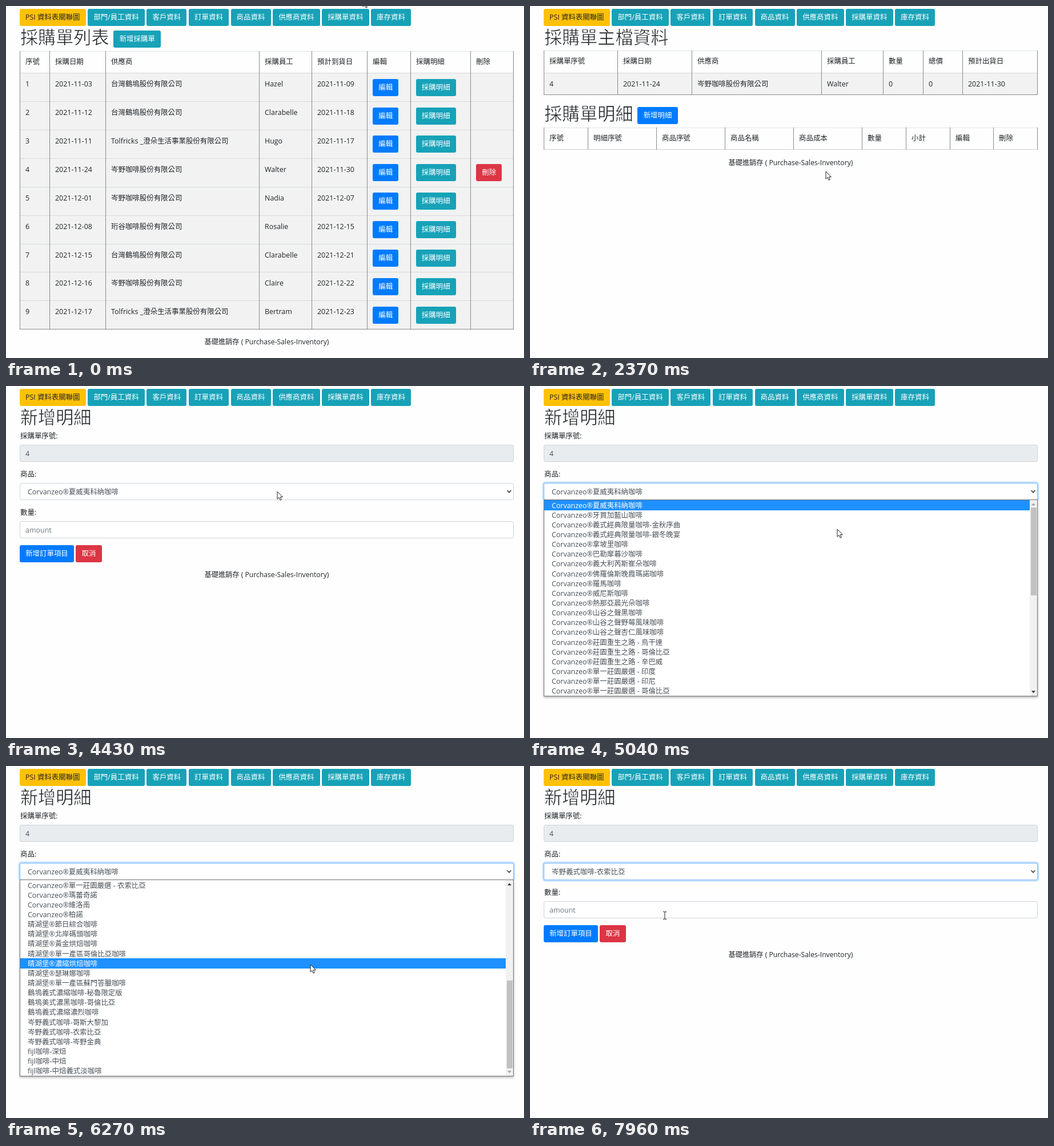
An HTML page for the animation above (8 s loop, 907 by 617 pixels).

```html
<!DOCTYPE html>
<html lang="zh-Hant">
<head>
<meta charset="utf-8">
<title>PSI</title>
<style>
html, body { margin: 0; width: 100%; height: 100%; overflow: hidden; background: #fefefe; }
body { position: relative; font: 12.45px "Open Sans", "Noto Sans CJK TC", "Noto Sans CJK JP", sans-serif; color: #212529; }
div { position: absolute; box-sizing: border-box; white-space: pre; }
.page { inset: 0; }
.btn { border-radius: 3px; color: #fff; text-align: center; line-height: 29px; }
.title { font-size: 31.1px; font-weight: 300; -webkit-text-stroke: .6px #fefefe; }
.th { font-weight: 500; }
.field { border: 1px solid #ced4da; border-radius: 3px; background: #fff; }
.grey { color: #495057; }
svg { position: absolute; left: 0; top: 0; overflow: visible; }
</style>
</head>
<body>
<script>
const LOOP = 8000, STEP = 68.17, START = 120, BTN_H = 30;
const TEAL = ['#17a2b8', '#138496', 'rgba(23,162,184,.5)'];
const BLUE = ['#007bff', '#0069d9', 'rgba(0,123,255,.5)'];
const RED = ['#dc3545', '#c82333', 'rgba(220,53,69,.5)'];
const GOLD = ['#ffc107', '#e0a800', 'rgba(255,193,7,.5)'];

function box(parent, x, y, w, h, css = '', cls = '', text = '') {
  const d = document.createElement('div');
  d.className = cls;
  d.style.cssText = `left:${x}px;top:${y}px;width:${w}px;height:${h}px;${css}`;
  d.textContent = text;
  parent.append(d);
  return d;
}

// Text with its left edge at x, centred on cy.
function label(parent, x, cy, text, cls = '', css = '') {
  return box(parent, x, cy - 20, 0, 40, 'line-height:40px;' + css, cls, text);
}

function button(page, x, y, w, tone, text, css = '') {
  const el = box(page, x, y, w, BTN_H, `background:${tone[0]};` + css, 'btn', text);
  const b = { el, x, y, w, tone };
  page.buttons.push(b);
  return b;
}

function makePage(title) {
  const page = box(document.body, 0, 0, 907, 617, '', 'page');
  page.buttons = [];
  button(page, 24, 4.7, 115.5, GOLD, 'PSI 資料表關聯圖', 'color:#212529');
  const nav = [[143, 100, '部門/員工資料'], [246.3, 70, '客戶資料'], [320, 70, '訂單資料'], [393.5, 70, '商品資料'],
    [467, 82.5, '供應商資料'], [553, 82.5, '採購單資料'], [639, 70, '庫存資料']];
  for (const [x, w, text] of nav) button(page, x, 4.7, w, TEAL, text);
  label(page, 25, 53.5, title, 'title');
  return page;
}

const footer = (page, cy) => box(page, 0, cy - 20, 913, 40, 'line-height:40px;text-align:center;font-size:12.2px', '',
  '基礎進銷存 ( Purchase-Sales-Inventory)');

function table(page, xs, y, headH, rowH, heads, rows, textY) {
  const left = xs[0], width = xs[xs.length - 1] - left + 1, bottom = y + headH + rowH * rows.length;
  const line = (ly, color) => box(page, left, Math.round(ly), width, 1, `background:${color}`);
  heads.forEach((h, i) => label(page, xs[i] + 10, y + 19.3, h, 'th'));
  rows.forEach((cells, r) => {
    const top = y + headH + rowH * r;
    box(page, left, top, width, rowH, 'background:#f2f2f2');
    cells.forEach((c, i) => label(page, xs[i] + 10, top + textY, c));
  });
  line(y, '#dee2e6');
  rows.forEach((_, r) => line(y + headH + rowH * r, '#d5d9dd'));
  line(bottom, rows.length ? '#8a8a8a' : '#ccd0d4');
  for (const x of xs) box(page, x, y, 1, bottom - y + 1, 'background:#8a8a8a');
}

// Purchase list
const list = makePage('採購單列表');
button(list, 188.4, 43, 82.7, TEAL, '新增採購單');
const crane = '台灣鶴塢股份有限公司', tolf = 'Tolfricks _澄朵生活事業股份有限公司', cen = '岑野咖啡股份有限公司';
const orders = [
  ['11-03', crane, 'Hazel', '11-09'], ['11-12', crane, 'Clarabelle', '11-18'], ['11-11', tolf, 'Hugo', '11-17'],
  ['11-24', cen, 'Walter', '11-30'], ['12-01', cen, 'Nadia', '12-07'], ['12-08', '珩谷咖啡股份有限公司', 'Rosalie', '12-15'],
  ['12-15', crane, 'Clarabelle', '12-21'], ['12-16', cen, 'Claire', '12-22'], ['12-17', tolf, 'Bertram', '12-23']
].map(([d, firm, who, due], i) => [i + 1, '2021-' + d, firm, who, '2021-' + due]);
table(list, [24, 76, 174, 443, 535, 632, 708, 813, 888], 79, 38.3, 49.87,
  ['序號', '採購日期', '供應商', '採購員工', '預計到貨日', '編輯', '採購明細', '刪除'], orders, 20);
const details = orders.map((_, i) => {
  const y = 127.7 + 49.87 * i;
  button(list, 642, y, 45.4, BLUE, '編輯');
  if (i === 3) button(list, 823, y, 45.4, RED, '刪除');
  return button(list, 717.5, y, 70.5, TEAL, '採購明細');
});
footer(list, 588.5);

// Purchase record
const record = makePage('採購單主檔資料');
table(record, [24, 153, 283, 510, 618, 688, 757, 888], 78, 38.8, 38.5,
  ['採購單序號', '採購日期', '供應商', '採購員工', '數量', '總價', '預計出貨日'],
  [['4', '2021-11-24', cen, 'Walter', '0', '0', '2021-11-30']], 19.8);
label(record, 25, 187.5, '採購單明細', 'title');
const addItem = button(record, 188.4, 177, 70.3, BLUE, '新增明細');
table(record, [24, 101, 221, 341, 461, 581, 658, 735, 811, 888], 212.5, 38.5, 0,
  ['序號', '明細序號', '商品序號', '商品名稱', '商品成本', '數量', '小計', '編輯', '刪除'], [], 0);
footer(record, 274.5);

// New item form
const form = makePage('新增明細');
label(form, 25, 87.5, '採購單序號:');
box(form, 24, 103, 865, BTN_H, 'background:#e9ecef', 'field');
label(form, 34, 118.5, '4', 'grey');
label(form, 25, 154.5, '商品:');
const select = box(form, 24, 169.8, 865, BTN_H, '', 'field');
const chosen = label(form, 38, 185.5, '', 'grey');
form.insertAdjacentHTML('beforeend',
  '<svg width="907" height="617"><path d="M877.6 183l3.4 3.6l3.4-3.6" fill="none" stroke="#343a40" stroke-width="1.6"/></svg>');
label(form, 25, 221.5, '數量:');
box(form, 24, 236.8, 865, BTN_H, '', 'field');
label(form, 34, 252.5, 'amount', '', 'color:#6c757d');
button(form, 24, 279, 95, BLUE, '新增訂單項目');
button(form, 122.3, 279, 45.4, RED, '取消');
footer(form, 330.5);

// Product menu
const withBrand = (brand, names) => names.split('|').map(n => brand + n);
const products = [
  ...withBrand('Corvanzeo®', '夏威夷科納咖啡|牙買加藍山咖啡|義式經典限量咖啡-金秋序曲|義式經典限量咖啡-銀冬晚宴|拿坡里咖啡|' +
    '巴勒摩暮沙咖啡|義大利芮斯崔朵咖啡|佛羅倫斯晚霞瑪諾咖啡|羅馬咖啡|威尼斯咖啡|熱那亞晨光朵咖啡|山谷之聲黑咖啡|' +
    '山谷之聲野莓風味咖啡|山谷之聲杏仁風味咖啡|莊園重生之路 - 烏干達|莊園重生之路 - 哥倫比亞|莊園重生之路 - 辛巴威|' +
    '單一莊園嚴選 - 印度|單一莊園嚴選 - 印尼|單一莊園嚴選 - 哥倫比亞|單一莊園嚴選 - 尼加拉瓜|單一莊園嚴選 - 衣索比亞|' +
    '瑪蕾奇諾|維洛南|柏諾'),
  ...withBrand('晴湖堡®', '節日綜合咖啡|北岸碼頭咖啡|黃金烘焙咖啡|單一產區哥倫比亞咖啡|濃縮烘焙咖啡|瑟琳娜咖啡|單一產區蘇門答臘咖啡'),
  ...withBrand('鶴塢', '義式濃縮咖啡-秘魯限定版|美式濃黑咖啡-哥倫比亞|義式濃縮濃烈咖啡'),
  ...withBrand('岑野', '義式咖啡-哥斯大黎加|義式咖啡-衣索比亞|義式咖啡-岑野金典'),
  ...withBrand('fijl', '咖啡-深焙|咖啡-中焙|咖啡-中焙義式淡咖啡')
];
const VISIBLE = 20, PITCH = 17.13, MENU_TOP = 200.4, MAX_SCROLL = products.length - VISIBLE;
const menu = box(form, 0, 0, 907, 617);
box(menu, 24, 199, 865, 345, 'background:#fff;border:1px solid #777;box-shadow:0 2px 4px rgba(0,0,0,.3)');
const bar = box(menu, 25, 0, 850, 17.4, 'background:#1e90ff');
const rows = Array.from({ length: VISIBLE }, (_, i) => label(menu, 38, MENU_TOP + 9.3 + PITCH * i, ''));
box(menu, 875, 200, 13, 343, 'background:#f1f1f1');
const thumb = box(menu, 876.5, 213, 10.5, 154, 'background:#c1c1c1');
menu.insertAdjacentHTML('beforeend', '<svg width="907" height="617"><path d="M878 209.2h7l-3.5-4z"/><path d="M878 534.3h7l-3.5 4z"/></svg>');
const [upArrow, downArrow] = menu.querySelectorAll('path');

// Pointer shapes, hot spot at 0,0
document.body.insertAdjacentHTML('beforeend', `<svg id="pointer" width="1" height="1" fill="#fff" stroke="#222" stroke-width="1">
<path d="M0 0V13.2L3 10.4L5.1 15.2L7.3 14.3L5.3 9.6H9.4Z"/>
<path d="M-1.3 10V1Q0-.8 1.3 1V6Q2.6 5 3.8 6.6Q5.2 5.8 6.2 7.3Q8 6.8 8.4 8.6V12Q8 14 7 16.5H-1Q-2.5 13.5-5 10.5Q-5.4 8.4-3.6 8.5Z"/>
<path d="M-3-6.5H-.8L0-6L.8-6.5H3M0-6V6M-3 6.5H-.8L0 6L.8 6.5H3" fill="none"/></svg>`);
const pointer = document.getElementById('pointer'), shapes = [...pointer.children];

const path = [
  [0, 625, -12], [52, 625, -12], [350, 630, 18], [500, 636, 68], [880, 664, 200], [890, 664, 200],
  [1270, 690, 268], [1480, 738, 334], [1690, 748, 293], [2020, 748, 293], [2370, 518, 290], [2600, 335, 242],
  [2850, 242, 207], [2870, 242, 207], [3150, 236, 194], [4070, 236, 194], [4550, 532, 183], [4820, 532, 183],
  [5028, 538, 251], [5369, 540, 324], [5650, 540, 324], [5990, 538, 340], [6145, 538, 340], [6732, 467, 457],
  [6945, 450, 467], [7340, 450, 467], [7955, 236, 262], [8000, 236, 262]
];
const same = (a, b) => a[1] === b[1] && a[2] === b[2];

function slope(i, k) {
  const a = path[i - 1], p = path[i], b = path[i + 1];
  return !a || !b || same(a, p) || same(p, b) ? 0 : (b[k] - a[k]) / (b[0] - a[0]);
}

// Cubic Hermite through the path points, at rest beside every pause.
function pointerAt(t) {
  let i = 0;
  while (i < path.length - 2 && path[i + 1][0] <= t) i++;
  const a = path[i], b = path[i + 1], d = b[0] - a[0], u = Math.min(1, (t - a[0]) / d), v = 1 - u;
  return [1, 2].map(k => v * v * (1 + 2 * u) * a[k] + u * u * (3 - 2 * u) * b[k]
    + u * v * v * d * slope(i, k) - u * u * v * d * slope(i + 1, k));
}

function pageAt(t) {
  if (t < 1765) return list;
  if (t < 1825) return null;
  if (t < 3595) return record;
  return t < 3735 ? null : form;
}

function drawMenu(t, y) {
  const scroll = Math.round(MAX_SCROLL * Math.max(0, Math.min(1, (t - 5040) / 270)));
  const active = t < 5090 ? 0 : Math.floor((y - MENU_TOP) / PITCH);
  bar.style.top = MENU_TOP + PITCH * active + 'px';
  rows.forEach((row, i) => {
    row.textContent = products[scroll + i];
    row.style.color = i === active ? '#fff' : '#495057';
  });
  thumb.style.top = 213 + 163 * scroll / MAX_SCROLL + 'px';
  upArrow.style.cssText = `stroke:none;fill:${scroll ? '#333' : '#a3a3a3'}`;
  downArrow.style.cssText = `stroke:none;fill:${scroll < MAX_SCROLL ? '#333' : '#a3a3a3'}`;
}

function draw(now) {
  const clock = now % LOOP;
  const t = clock < START ? 0 : START + Math.floor((clock - START) / STEP + 0.1) * STEP;
  const [x, y] = pointerAt(t), page = pageAt(t + 2);
  for (const p of [list, record, form]) p.style.display = p === page ? '' : 'none';

  const open = t > 4740 && t < 7270;
  let shape = 0;
  if (page) {
    const pressed = t > 3465 ? addItem : t > 1690 ? details[3] : null;
    for (const b of page.buttons) {
      const over = !open && x >= b.x && x <= b.x + b.w && y >= b.y && y <= b.y + BTN_H;
      if (over) shape = 1;
      b.el.style.background = b.tone[over ? 1 : 0];
      b.el.style.boxShadow = b === pressed ? `0 0 0 2.4px ${b.tone[2]}` : 'none';
    }
  }
  if (page === form) {
    const focus = t > 4740;
    select.style.borderColor = focus ? '#80bdff' : '#ced4da';
    select.style.boxShadow = focus ? '0 0 0 2.4px rgba(0,123,255,.25)' : 'none';
    chosen.textContent = products[t < 7270 ? 0 : MAX_SCROLL + 15];
    menu.style.display = open ? '' : 'none';
    if (open) drawMenu(t, y);
    else if (y > 237 && y < 266) shape = 2;
  }
  shapes.forEach((s, i) => { s.style.display = i === shape ? '' : 'none'; });
  pointer.style.transform = `translate(${Math.round(x)}px,${Math.round(y)}px)`;
}

let begin;
function tick(now) {
  begin ??= now;
  draw(now - begin);
  requestAnimationFrame(tick);
}
draw(0);
requestAnimationFrame(tick);
</script>
</body>
</html>
```
